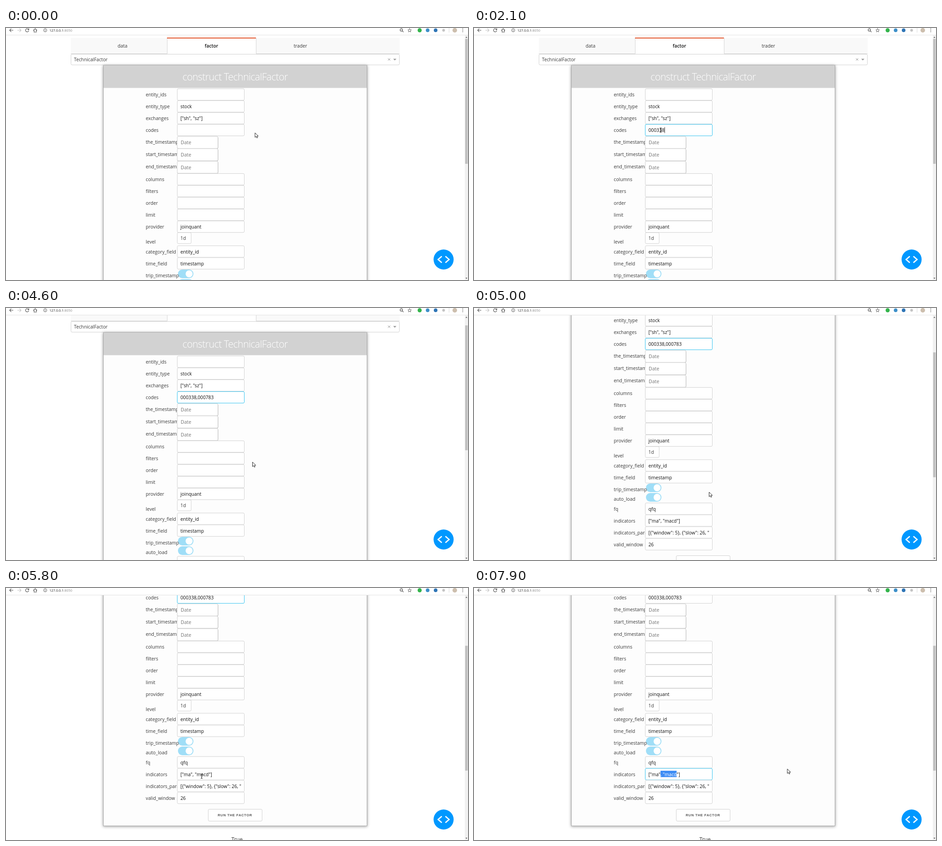
An HTML page for the animation above (8000 ms loop, 1013 by 553 pixels).

```html
<!DOCTYPE html>
<html lang="en">
<head>
<meta charset="utf-8">
<title>Factor form</title>
<style>
  html, body { margin: 0; height: 100%; overflow: hidden; background: #fff; }
  svg { display: block; font: 10.25px "Open Sans", sans-serif; fill: #3a3a3a; }
  text { white-space: pre; }
  .box { fill: #fff; stroke: #d1d1d1; }
  .focus { stroke: #33c3f0; }
  .value { fill: #111; }
  .title { font-size: 21.5px; font-weight: 300; letter-spacing: -.6px; fill: #fff; }
  .button { font: bold 7.5px "Liberation Sans", sans-serif; letter-spacing: .68px; fill: #555; }
  .line { fill: none; stroke: #555; stroke-width: 1.2; }
  .mid { text-anchor: middle; }
</style>
</head>
<body>
<svg width="1013" height="553" viewBox="0 0 1013 553">
  <g id="page">
    <path d="M142 22H863V57H142Z" fill="#f9f9f9"/>
    <path d="M142 56.5H353.5V22M548.5 22V56.5H863" fill="none" stroke="#d6d6d6"/>
    <path d="M354 22H548V57H354Z" fill="#fff"/>
    <path d="M353 21H548V23H353Z" fill="#e2562d"/>
    <g class="mid">
      <text x="255.5" y="43">data</text>
      <text x="450.5" y="43" fill="#111" font-weight="600">factor</text>
      <text x="645.5" y="43">trader</text>
    </g>
    <rect class="box" x="142.5" y="57.5" width="720" height="23.5" rx="2.5"/>
    <text x="149" y="73">TechnicalFactor</text>
    <path d="M837.5 66.5l5 5m0-5l-5 5" stroke="#999"/>
    <path d="M849 67.5h7l-3.5 3.8z" fill="#999"/>

    <rect x="213.5" y="82" width="578" height="643" fill="#fdfdfd" stroke="#a6a6a6"
          style="filter: drop-shadow(0 1px 3px #0006)"/>
    <path d="M214 82H791V131.5H214Z" fill="#d2d2d2"/>
    <text class="title mid" x="502.5" y="114.5">construct TechnicalFactor</text>
    <g id="form"></g>
    <rect id="selection" y="401" height="14" transform="translate(0 203)" fill="#3d8df5"/>
    <rect class="box" x="443.5" y="688.5" width="118" height="26" rx="2.5" stroke="#bbb"/>
    <text class="button" x="464.2" y="704.3">RUN THE FACTOR</text>
    <text class="mid" x="506.5" y="759" font-size="11.8">True</text>
    <path id="caret" stroke="#111" stroke-width=".9"/>
  </g>

  <path d="M1006 16h7v537h-7z" fill="#f1f1f1"/>
  <rect id="thumb" x="1006.7" width="5.6" height="274" fill="#c1c1c1"/>
  <path d="M1007.5 21.5h4l-2-2.6zM1007.5 548h4l-2 2.6z" fill="#505050"/>

  <circle cx="959.5" cy="508" r="22" fill="#0098ff"/>
  <path d="M955.5 501l-8 7 8 7M963.5 501l8 7-8 7" fill="none" stroke="#fff" stroke-width="2.7"/>

  <path d="M0 0h1013v15H0z" fill="#fff"/>
  <path d="M0 15.5h1013" stroke="#e2e2e2"/>
  <g class="line">
    <path d="M16 5H8m3.5-3.7L8 5l3.5 3.7"/>
    <path d="M25 5h8m-3.500-3.700L33 5l-3.500 3.700" stroke="#c4c4c4"/>
    <path d="M49.300 3A3.500 3.500 0 1 0 49.800 6M50 1v2.800h-2.800"/>
    <path d="M60 5.300l4-3.800 4 3.800M61.500 4.500V9h5V4.500"/>
    <circle cx="86" cy="5" r="3.500" stroke-width=".9"/>
    <path d="M86 4.600v2.400M86 2.800v.9" stroke-width="1"/>
    <circle cx="866.800" cy="4.300" r="2.600"/>
    <path d="M868.800 6.300l2.700 2.700"/>
    <path d="M885 1.200l1.100 2.600 2.800.2-2.100 1.900.6 2.800-2.400-1.500-2.400 1.500.6-2.800-2.100-1.900 2.800-.2z" stroke-width=".9"/>
    <path d="M971.500 0v10" stroke="#ddd" stroke-width="1"/>
  </g>
  <text x="95" y="7.800" font-size="7.400" fill="#222">127.0.0.1<tspan fill="#888">:8050</tspan></text>
  <circle cx="907" cy="5" r="4.500" fill="#32b44a"/>
  <circle cx="924.500" cy="5" r="4" fill="#3b8fc9"/>
  <circle cx="942" cy="5" r="4" fill="#2d74b5"/>
  <circle cx="959.500" cy="5" r="3" fill="#c4c4c4"/>
  <circle cx="984" cy="5" r="5" fill="#cdbfae"/>
  <path d="M1001.500 1v1.500m0 1.800v1.500m0 1.800v1.500" stroke="#555" stroke-width="1.500"/>

  <g id="cursor">
    <path d="M0 0V10L2.400 7.900 4 11.300 5.700 10.500 4.200 7.200H7.200Z" fill="#fff" stroke="#111" stroke-width=".9"/>
    <path d="M-2-5q2 0 2 1.200q0-1.200 2-1.200M0-4V4M-2 5q2 0 2-1.200q0 1.200 2 1.200" fill="none" stroke="#111"/>
  </g>
</svg>
<script>
const DURATION = 8000;
const VALUE_X = 382.5;
const $ = id => document.getElementById(id);

// label, baseline, kind, value
const rows = [
  ['entity_ids', 150, 'input'],
  ['entity_type', 176, 'input', 'stock'],
  ['exchanges', 202, 'input', '["sh", "sz"]'],
  ['codes', 228, 'input'],
  ['the_timestamp', 253.5, 'date'],
  ['start_timestamp', 280.5, 'date'],
  ['end_timestamp', 308, 'date'],
  ['columns', 336, 'input'],
  ['filters', 362, 'input'],
  ['order', 388, 'input'],
  ['limit', 414, 'input'],
  ['provider', 440, 'input', 'joinquant'],
  ['level', 473, 'level', '1d'],
  ['category_field', 494.5, 'input', 'entity_id'],
  ['time_field', 520.5, 'input', 'timestamp'],
  ['trip_timestamp', 546.5, 'toggle'],
  ['auto_load', 567.5, 'toggle'],
  ['fq', 589.5, 'input', 'qfq'],
  ['indicators', 615.5, 'input', '["ma", "macd"]'],
  ['indicators_params', 641.5, 'input', '[{"window": 5}, {"slow": 26, "'],
  ['valid_window', 667.5, 'input', '26'],
];

const box = (y, w, h, extra = '') =>
  `<rect class="box" x="375.5" y="${y - h / 2}" width="${w}" height="${h}" rx="2.5" ${extra}/>`;

const widgets = {
  input: (name, y, value = '') => box(y - 4, 147, 25.3, `id="${name}-box"`) +
    `<text class="value" id="${name}" x="${VALUE_X}" y="${y}">${value}</text>`,
  date: (name, y) => box(y - 1.9, 89.5, 26.5, 'style="stroke:#bbb"') + box(y - 2.5, 89, 26.5) +
    `<text x="383" y="${y + 1.5}" font-size="10.5" fill="#757575">Date</text>`,
  level: (name, y, value) => box(y - 12, 30.5, 24) +
    `<text x="${VALUE_X}" y="${y - 8}">${value}</text>`,
  toggle: (name, y) =>
    `<rect x="377" y="${y - 16.5}" width="34" height="19" rx="9.5" fill="#a0def7"/>` +
    `<circle cx="401.500" cy="${y - 7}" r="7.700" fill="#fff"/>`,
};

const draw = test => rows.filter(([, , kind]) => test(kind))
  .map(([name, y, kind, value]) => widgets[kind](name, y, value)).join('');
const labels = rows.map(([name, y]) => `<text x="306.500" y="${y}">${name}</text>`).join('');
$('form').innerHTML = draw(k => k === 'toggle') + labels + draw(k => k !== 'toggle');

// Each track lists [start time, state...]; a state holds until the next one.
const scrolls = [[0, 0], [4600, 28], [5000, 145], [5300, 199], [5800, 203]];
const typed = [[0, 0], [1300, 1], [1400, 2], [1500, 3], [1800, 4], [2000, 5], [2100, 6], [3700, 12], [4000, 13]];
const selected = [[0, 5], [7100, 7], [7600, 10], [7900, 12]];
const focus = [[0, ''], [700, 'codes'], [6500, 'indicators']];
const carets = [[0, ''], [700, 'codes'], [4600, ''], [6500, 'indicators'], [7100, '']];
const pointer = [
  [0, 546, 230, 'arrow'], [200, 455, 226, 'beam'], [300, 409.5, 224, 'beam'],
  [4300, 482.5, 276, 'arrow'], [4600, 540.5, 338, 'arrow'], [5000, 515.5, 404, 'arrow'],
  [5800, 429, 413, 'beam'], [6200, 411, 411.5, 'beam'], [6800, 687, 397, 'arrow'],
];
const at = (track, t) => track.findLast(([start]) => start <= t).slice(1);

const CODES = '000338,000783';
const INDICATORS = '["ma", "macd"]';
const SELECT_FROM = 5;
const [arrow, beam] = $('cursor').children;
const xAfter = (id, count) => VALUE_X + (count ? $(id).getSubStringLength(0, count) : 0);

function render(t) {
  const [scroll] = at(scrolls, t);
  $('page').setAttribute('transform', `translate(0 ${-scroll})`);
  $('thumb').setAttribute('y', 24 + scroll * .506);

  const [count] = at(typed, t);
  $('codes').textContent = CODES.slice(0, count);

  const [end] = at(selected, t);
  const left = xAfter('indicators', SELECT_FROM);
  $('indicators').innerHTML = INDICATORS.slice(0, SELECT_FROM) +
    `<tspan fill="#fff">${INDICATORS.slice(SELECT_FROM, end)}</tspan>` + INDICATORS.slice(end);
  $('selection').setAttribute('x', left);
  $('selection').setAttribute('width', xAfter('indicators', end) - left);

  const [active] = at(focus, t);
  for (const id of ['codes', 'indicators'])
    $(id + '-box').classList.toggle('focus', id === active);

  const [owner] = at(carets, t);
  const caretX = owner && xAfter(owner, owner === 'codes' ? count : SELECT_FROM) + .4;
  $('caret').setAttribute('d', owner ? `M${caretX} ${owner === 'codes' ? 217.5 : 605}v13` : '');

  const [x, y, shape] = at(pointer, t);
  $('cursor').setAttribute('transform', `translate(${x} ${y})`);
  arrow.style.display = shape === 'arrow' ? '' : 'none';
  beam.style.display = shape === 'beam' ? '' : 'none';
}

// The highlight sits between the field's box and its text.
$('indicators').before($('selection'));

const begin = performance.now();
function tick(now) {
  render(Math.max(0, now - begin) % DURATION);
  requestAnimationFrame(tick);
}
render(0);
requestAnimationFrame(tick);
</script>
</body>
</html>
```
